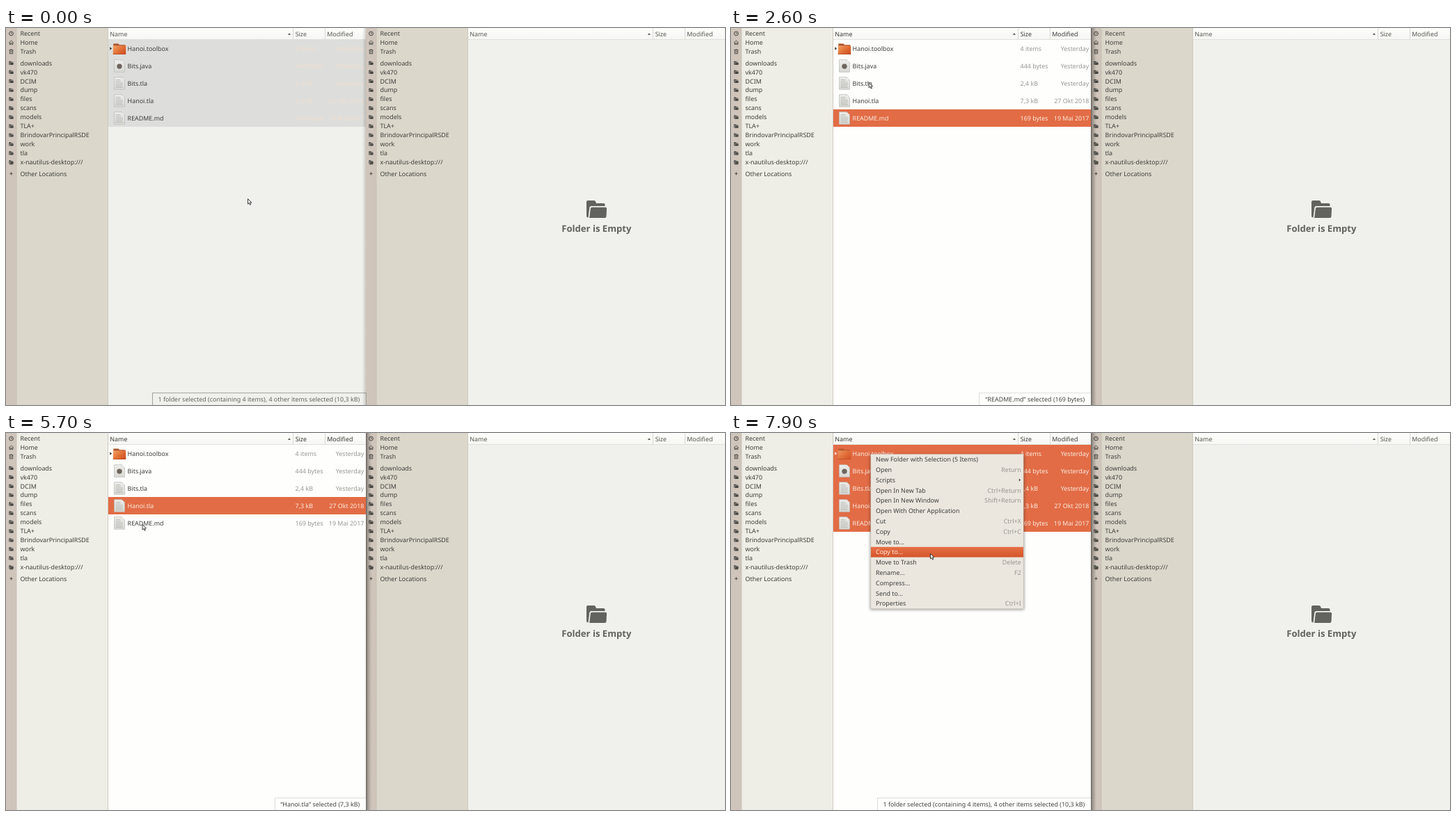
These frames come from a looping animation (1033 px wide and 542 px high, 8000 ms). An HTML page:

```html
<!DOCTYPE html>
<html lang="en">
<head>
<meta charset="utf-8">
<title>File manager</title>
<style>
html, body { margin: 0; width: 100%; height: 100%; overflow: hidden; background: #f0f1ec; }
svg { display: block; width: 1033px; height: 542px; }
text { font: 8.92px "Noto Sans", "Open Sans", sans-serif; fill: #3f3e3b; text-rendering: geometricPrecision; white-space: pre; }
.side { fill: #dbd7cb; }
.body { fill: #f0f1ec; }
.head text { fill: #565651; }
.on .side { fill: #eeeee6; }
.on .body { fill: #fefefc; }
.on .head text { fill: #393936; }
.pick { fill: none; }
.info { fill: #979793; }
.sel .pick { fill: #dddedb; }
.sel .info { fill: #f1dccf; }
.on .sel .pick { fill: #e26c45; }
.on .sel text { fill: #fcebe2; }
.on .sel .tri { fill: #fcebe2; }
.on .sel .folder { opacity: .75; }
.tri, .glyph { fill: #454440; }
.line { fill: none; stroke: #454440; }
.key { fill: #989690; }
.hot { fill: none; }
.hover .hot { fill: url(#hot); }
.hover text { fill: #fdeee6; }
</style>
</head>
<body>
<svg viewBox="0 0 1033 542" xmlns="http://www.w3.org/2000/svg">
  <defs>
    <linearGradient id="head" x2="0" y2="1"><stop stop-color="#fdfdfb"/><stop offset="1" stop-color="#f6f7f3"/></linearGradient>
    <linearGradient id="hot" x2="0" y2="1"><stop stop-color="#e76f45"/><stop offset="1" stop-color="#d4562b"/></linearGradient>
    <linearGradient id="page" x2="0" y2="1"><stop stop-color="#eeefec"/><stop offset="1" stop-color="#d8d9d4"/></linearGradient>
    <linearGradient id="orange" x2="1" y2="0.8"><stop stop-color="#f0a468"/><stop offset=".5" stop-color="#e4763a"/><stop offset="1" stop-color="#cf4f22"/></linearGradient>
    <linearGradient id="dark"><stop stop-color="#000" stop-opacity=".5"/><stop offset=".35" stop-color="#000" stop-opacity=".22"/><stop offset="1" stop-color="#000" stop-opacity="0"/></linearGradient>
    <linearGradient id="soft"><stop stop-color="#000" stop-opacity="0"/><stop offset="1" stop-color="#000" stop-opacity=".16"/></linearGradient>
    <filter id="blur" x="-10%" y="-10%" width="120%" height="120%"><feGaussianBlur stdDeviation="2"/></filter>
  </defs>
  <g id="stage"></g>
</svg>
<script>
const PANE = 517, ROW = 25, ITEM = 14.8, MENU_TOP = 30.6, LOOP = 8000;
const stage = document.getElementById("stage");
const $ = id => document.getElementById(id);

const rect = (x, y, w, h, attrs) => `<rect x="${x}" y="${y}" width="${w}" height="${h}" ${attrs}/>`;
// Text placed by the middle of its capitals.
const label = (x, mid, str, attrs = "") => `<text x="${x}" y="${mid + 3.2}" ${attrs}>${str}</text>`;
const path = (d, attrs) => `<path d="${d}" ${attrs}/>`;
const at = (x, y, inner, attrs = "") => `<g transform="translate(${x} ${y})" ${attrs}>${inner}</g>`;

const glyphs = {
  clock: `<circle r="2.9" class="line"/>` + path("M0-1.7V.2H1.4", 'class="line" stroke-width=".8"'),
  home: path("M-3.4.3L0-2.9 3.4.3M-2.3-.3V2.7H-.7V.7H.7V2.7H2.3V-.3", 'class="line" stroke-width=".9"'),
  trash: path("M-2.9-2.4H2.9M-2.2-2.4V2.9H2.2V-2.4M-.9-3.2H.9M-1-.6H1M-1 1H1", 'class="line" stroke-width=".9"'),
  folder: path("M-3.2-2.6H-.6L.1-1.8H2.3V-1H-1.9L-2.7 2.5H-3.2ZM-1.5-.5H3.4L2.9 2.6H-2.2Z", 'class="glyph"'),
  plus: path("M-2.2 0H2.2M0-2.2V2.2", 'class="line" stroke-width=".9"')
};
glyphs.desk = glyphs.folder + path("M-2.4 3H2.6", 'class="line" stroke-width=".9"');

const places = ["downloads", "vk470", "DCIM", "dump", "files", "scans", "models", "TLA+",
  "BrindovarPrincipalRSDE", "work", "tla", "x-nautilus-desktop:///"];

function sidebar() {
  const rows = [["clock", 8, "Recent"], ["home", 21, "Home"], ["trash", 34, "Trash"]];
  places.forEach((name, i) => rows.push([name.includes(":") ? "desk" : "folder", 50.4 + 12.95 * i, name]));
  rows.push(["plus", 209.3, "Other Locations"]);
  return rows.map(([icon, y, name]) => at(7.5, y, glyphs[icon]) + label(20.5, y, name)).join("");
}

function pane(id, x, content) {
  const seps = [412.5, 458.5].map(p => path(`M${p} 0V16.5`, 'stroke="#d9dad3"')).join("");
  const head = rect(147, 0, 370, 17, 'fill="url(#head)"') + path("M147 16.5H517", 'stroke="#e0e1da"') + seps +
    label(149.3, 8.3, "Name") + label(415.7, 8.3, "Size") + label(461.3, 8.3, "Modified") +
    path("M404.8 9.8L407 7.4 409.2 9.8Z", 'class="tri"');
  return at(x, 0,
    rect(0, 0, PANE, 542, 'class="body"') +
    rect(15, 0, 132, 542, 'class="side"') +
    rect(0, 0, 15, 542, 'fill="#cfc5bb"') +
    path("M15.2 0V542", 'stroke="#c3bab0" stroke-width=".6"') +
    path("M146.5 0V542", 'stroke="#cfcbc0"') +
    sidebar() + `<g class="head">${head}</g>` + content, `id="${id}"`);
}

const page = path("M155.5-8.8H166L170.5-4.5V8.8H155.5Z", 'fill="url(#page)" stroke="#b9bab5" stroke-width=".7"') +
  path("M166-8.8V-4.5H170.5Z", 'fill="#fafaf8" stroke="#c2c3be" stroke-width=".5"');
const lines = path("M157.5-5H164M157.5-2.8H165M157.5-.6H168M157.5 1.6H168M157.5 3.8H167M157.5 6H168",
  'stroke="#b0b1ac" stroke-width=".8"');
const icons = {
  folder: `<g class="folder">` +
    path("M154.3-7H161.5L163-5.3H171.3V0H154.3Z", 'fill="#a9532c"') +
    path("M153.8-4.2H172.2V8.4H153.8Z", 'fill="url(#orange)"') +
    path("M153.8 8H172.2", 'stroke="#b9481f" stroke-width=".8"') + `</g>` +
    path("M149.2-2.3L152.3 0 149.2 2.3Z", 'class="tri"'),
  code: page + `<circle cx="163" cy=".6" r="3.7" fill="#6d655d"/>`,
  doc: page + lines
};

const files = [
  ["folder", "Hanoi.toolbox", "4 items", "Yesterday"],
  ["code", "Bits.java", "444 bytes", "Yesterday"],
  ["doc", "Bits.tla", "2,4 kB", "Yesterday"],
  ["doc", "Hanoi.tla", "7,3 kB", "27 Okt 2018"],
  ["doc", "README.md", "169 bytes", "19 Mai 2017"]
];
const fileList = files.map(([icon, name, size, date], i) => at(0, 29.5 + ROW * i,
  rect(147, -12.5, 370, ROW, 'class="pick"') + icons[icon] + label(174.6, 0, name) +
  label(415.6, 0, size, 'class="info"') + label(514.4, 0, date, 'class="info" text-anchor="end"'), 'class="file"')).join("");

const emptyNote =
  path("M834 250Q834 248 836 248H845Q846.5 248 847 249.5L848 252H858.5Q860.5 252 860.5 254V256H841Q838.6 256 838.3 258.3L836.5 272.5Q834 272.5 834 270Z", 'fill="#62625e"') +
  path("M842 257.8H861.3Q863.2 257.8 863.1 259.8L862.5 271Q862.3 273 860.3 273H838.2L839.8 259.8Q840 257.8 842 257.8Z", 'fill="#62625e"') +
  `<text x="848.4" y="293.4" text-anchor="middle" style="font-size:13.1px;font-weight:700;fill:#62625e">Folder is Empty</text>`;

const menuItems = [["New Folder with Selection (5 Items)"], ["Open", "Return"], ["Scripts", ">"],
  ["Open In New Tab", "Ctrl+Return"], ["Open In New Window", "Shift+Return"], ["Open With Other Application"],
  ["Cut", "Ctrl+X"], ["Copy", "Ctrl+C"], ["Move to..."], ["Copy to..."], ["Move to Trash", "Delete"],
  ["Rename..."  , "F2"], ["Compress..."], ["Send to..."], ["Properties", "Ctrl+I"]];

function menu() {
  const rows = menuItems.map(([name, key], i) => {
    const mark = key === ">" ? path("M413.8-2L416.2 0 413.8 2Z", 'class="tri"')
      : key ? label(416.8, 0, key, 'class="key" text-anchor="end"') : "";
    return at(0, 38 + ITEM * i, rect(201, -7.4, 219, ITEM, 'class="hot"') + label(208, 0, name) + mark, 'class="item"');
  }).join("");
  return `<g id="menu">` + rect(200, 32, 221, 222, 'fill="#000" opacity=".4" filter="url(#blur)"') +
    rect(200.9, MENU_TOP, 219.2, 222, 'fill="#ebe7df" stroke="#cfc8bd" stroke-width=".6"') + rows + `</g>`;
}

stage.innerHTML =
  pane("right", PANE, "") + emptyNote +
  pane("left", 0, fileList + rect(0, 524.7, 0, 20, 'id="box"') +
    label(508.2, 533.5, "", 'id="status" text-anchor="end"')) +
  rect(512, 0, 5, 542, 'id="near" fill="url(#soft)"') +
  rect(517, 0, 8, 542, 'id="far" fill="url(#dark)"') +
  menu() +
  path("M0 0V7.6L1.8 6 3 8.8 4.3 8.2 3.1 5.5H5.4Z",
    'id="cursor" fill="#f4f4f1" stroke="#2b2b29" stroke-width=".9" stroke-linejoin="round"');

const fileRows = [...document.querySelectorAll(".file")];
const itemRows = [...document.querySelectorAll(".item")];

// time, x, y of the pointer tip
const track = [[0, 347.5, 245.5], [500, 347.5, 245.5], [1000, 223, 142], [1200, 223, 142], [1300, 213, 131],
  [1400, 213, 131], [1500, 212.7, 129.5], [1700, 211, 110], [1800, 211, 110], [2100, 209, 36], [2200, 209, 36],
  [2300, 206.5, 47], [2400, 206.5, 47], [2700, 194, 94], [3200, 194, 94], [3400, 192.5, 104], [4000, 192.5, 104],
  [4300, 194, 97], [4500, 194, 97], [4900, 196, 75], [5100, 197, 108], [5400, 197, 108], [5700, 196, 131.5],
  [6000, 196, 131.5], [6500, 198, 33.3], [7000, 198, 33.3], [7100, 200.5, 30], [7300, 200.5, 30],
  [7900, 286.5, 173.3], [LOOP, 286.5, 173.3]];

// start time, selected rows
const picks = [[0, [0, 1, 2, 3, 4]], [1500, [4]], [2700, [3]], [5800, [4]], [6700, [0, 1, 2, 3, 4]]];

const allText = "1 folder selected (containing 4 items), 4 other items selected (10,3 kB)";
const readmeText = "“README.md” selected (169 bytes)";
// start time, left edge, text
const notes = [[0, 210.5, allText], [1700, 356.5, readmeText], [2900, 386.5, "“Hanoi.tla” selected (7,3 kB)"],
  [6100, 356.5, readmeText], [6900, 210.5, allText]];

const current = (list, t) => list.filter(e => e[0] <= t).pop();

function pointer(t) {
  const i = track.findIndex(k => k[0] > t);
  const [t0, x0, y0] = track[i - 1], [t1, x1, y1] = track[i];
  const k = (t - t0) / (t1 - t0);
  return [x0 + (x1 - x0) * k, y0 + (y1 - y0) * k];
}

function draw(time) {
  const t = Math.floor(time / 100) * 100;
  const raised = t >= 1300, active = t >= 1500, open = t >= 7100;

  $("left").setAttribute("class", active ? "on" : "");
  $("near").style.display = raised ? "none" : "";
  $("far").style.display = raised ? "" : "none";
  $("far").setAttribute("width", active ? 8 : 2);

  const selected = current(picks, t)[1];
  fileRows.forEach((row, i) => row.classList.toggle("sel", selected.includes(i)));

  const [, edge, text] = current(notes, t);
  const box = $("box");
  box.setAttribute("x", edge);
  box.setAttribute("width", 517.5 - edge);
  box.setAttribute("fill", active ? "#fefefc" : "#f0f1ec");
  box.setAttribute("stroke", raised ? "#dcdcd7" : "#a3a39e");
  $("status").textContent = text;
  $("status").style.fill = active ? "#45443f" : "#65645f";

  const [x, y] = pointer(t);
  $("cursor").setAttribute("transform", `translate(${x} ${y})`);
  $("menu").style.display = open ? "" : "none";
  const hover = open ? Math.floor((y - MENU_TOP) / ITEM) : -1;
  itemRows.forEach((row, i) => row.classList.toggle("hover", i === hover));
}

const start = performance.now();
function tick() {
  draw((performance.now() - start) % LOOP);
  requestAnimationFrame(tick);
}
tick();
</script>
</body>
</html>
```
